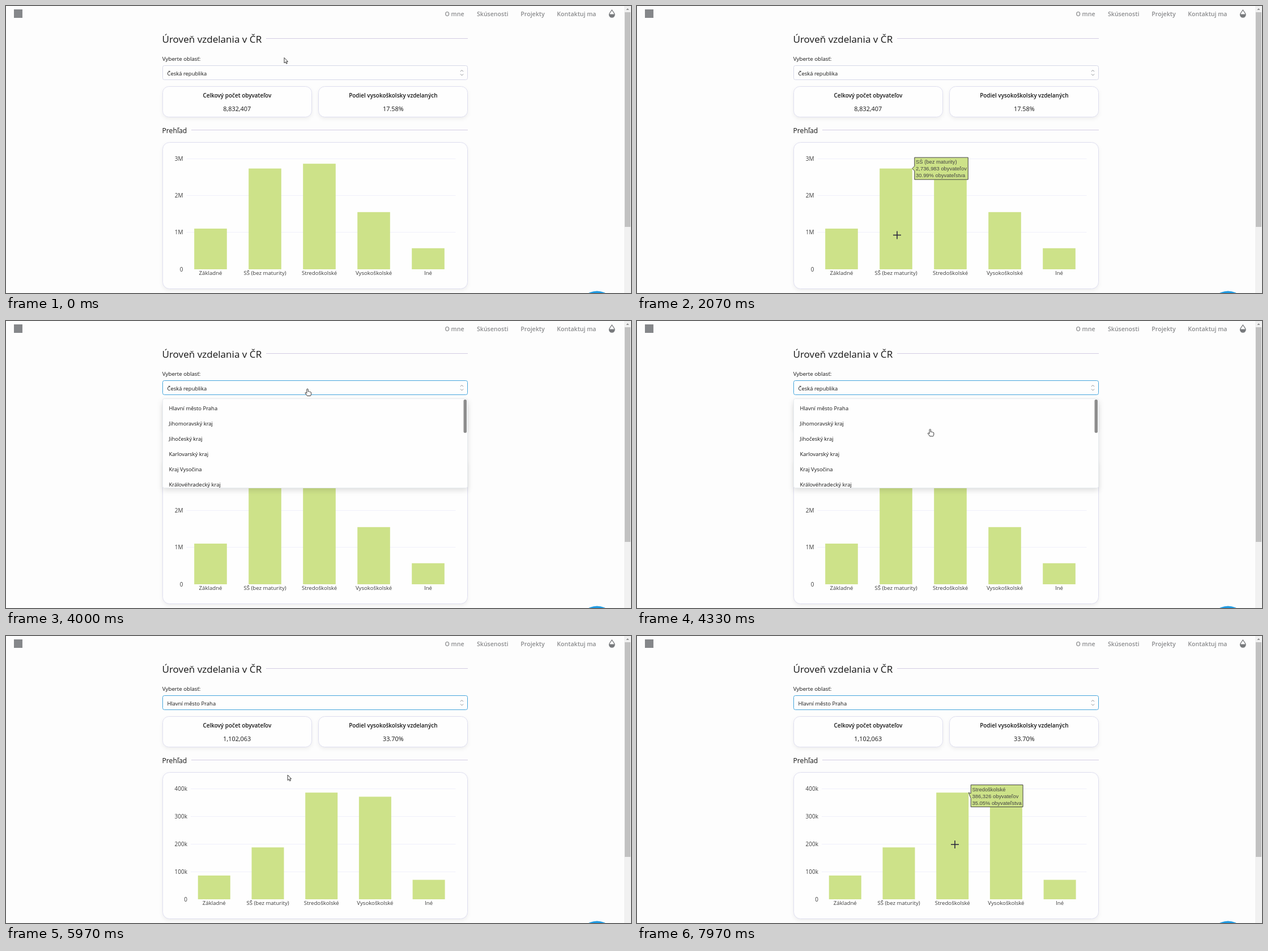
Animation of 1103x508 px, one loop 8000 ms. Source, as an HTML page:

```html
<!DOCTYPE html>
<html lang="sk">
<head>
<meta charset="utf-8">
<title>Úroveň vzdelania v ČR</title>
<style>
  html, body { margin: 0; width: 100%; height: 100%; overflow: hidden; background: #fdfdfd; }
  svg { display: block; width: 1103px; height: 508px; font-family: "Open Sans", "Noto Sans", sans-serif; font-size: 9.65px; fill: #141414; }
  .nav { font-size: 10.6px; font-weight: 600; fill: #8a8b8d; }
  .title { font-size: 17.1px; }
  .subtitle { font-size: 12.2px; }
  .label { font-size: 9.7px; font-weight: 500; }
  .item { font-size: 9.45px; }
  .head { font-size: 9.95px; font-weight: 600; }
  .stat { font-size: 10.9px; }
  .mid { text-anchor: middle; }
  .tick { font-size: 10px; text-anchor: end; fill: #3c3c3c; }
  .cat { text-anchor: middle; fill: #3c3c3c; }
  .rule { stroke: #d3cce2; }
  .grid { stroke: #f0f0fb; }
  .card { fill: #fefefe; stroke: #dedeef; filter: drop-shadow(0 3px 3px rgba(0, 0, 0, .06)); }
  .bar { fill: #cde289; }
  .tip { font-family: "Liberation Sans", Arial, sans-serif; font-size: 9.4px; fill: #444; }
  .tip path { fill: #cde289; stroke: #444; }
  #field { fill: #fefefe; stroke: #d6d8e8; }
  #field.focus { stroke: #45a5dc; }
  #menu .panel { fill: #fefefe; stroke: #e6eaee; filter: drop-shadow(0 4px 5px rgba(0, 0, 0, .12)); }
  .pointer { fill: #fff; stroke: #222; stroke-width: .9; stroke-linejoin: round; }
</style>
</head>
<body>
<svg viewBox="0 0 1103 508">
  <defs><clipPath id="menuClip"><rect x="276" y="138" width="539" height="157"/></clipPath></defs>

  <rect x="14" y="6" width="15" height="15" fill="#85878a"/>
  <g class="nav">
    <text x="774.5" y="18">O mne</text>
    <text x="831" y="18">Skúsenosti</text>
    <text x="908.3" y="18">Projekty</text>
    <text x="972.3" y="18">Kontaktuj ma</text>
  </g>
  <path d="M1069.3 7C1067.500 10 1064.500 12.300 1064.500 15.300A4.800 4.800 0 0 0 1074.100 15.300C1074.100 12.300 1071.100 10 1069.300 7Z" fill="none" stroke="#77797c" stroke-width="1.3"/>
  <path d="M1064.500 14.500H1074.100V15.300A4.800 4.800 0 0 1 1064.500 15.300Z" fill="#77797c"/>

  <text class="title" x="275.500" y="65">Úroveň vzdelania v ČR</text>
  <path class="rule" d="M459 57.500H815M327 219.500H815"/>
  <text class="label" x="275.800" y="96.500">Vyberte oblasť:</text>
  <rect id="field" x="276.500" y="105.500" width="538" height="25" rx="3"/>
  <text id="region" class="item" x="284.500" y="122.500"></text>
  <path d="M802 116L804.500 113.500L807 116M802 120.500L804.500 123L807 120.500" fill="none" stroke="#888d92"/>

  <rect class="card" x="276.500" y="142.500" width="263" height="54" rx="11"/>
  <rect class="card" x="551.500" y="142.500" width="263" height="54" rx="11"/>
  <g class="mid">
    <text class="head" x="407.800" y="161.500">Celkový počet obyvateľov</text>
    <text class="head" x="683.300" y="161.500">Podiel vysokoškolsky vzdelaných</text>
    <text id="total" class="stat" x="407.800" y="186"></text>
    <text id="share" class="stat" x="683.300" y="186"></text>
  </g>

  <text class="subtitle" x="275.500" y="224.500">Prehľad</text>
  <rect class="card" x="276.500" y="241.500" width="538" height="259" rx="12"/>
  <g id="charts"></g>

  <g id="tip" class="tip"><path/><text/><text/><text/></g>

  <g id="menu">
    <rect class="panel" x="276.500" y="137.500" width="538" height="158" rx="3"/>
    <g id="items" class="item" clip-path="url(#menuClip)"></g>
    <rect x="807.500" y="139" width="5.500" height="59" rx="2.500" fill="#8d8d8d"/>
  </g>

  <circle cx="1043" cy="537.500" r="33" fill="#1f9be3"/>
  <rect x="1091" width="12" height="508" fill="#f1f1f1"/>
  <rect x="1092" y="11" width="10" height="380" fill="#c1c1c1"/>
  <path d="M1094.500 7L1097 4L1099.500 7Z" fill="#8b8b8b"/>

  <g id="cursor">
    <path id="arrow" class="pointer" d="M.5 .5V10L2.700 8L4.200 11.200L5.800 10.500L4.300 7.400H7Z"/>
    <path id="hand" class="pointer" d="M-1.200 .8Q0 -1 1.200 .8V5Q2.500 4 3.300 5.300Q4.400 4.500 5 5.800Q6.200 5.200 6.500 6.600V9.500Q6.300 11 5.300 12.500H-.5Q-1.800 10.500 -4 7.800Q-4 6.300 -2.600 6.800L-1.200 8Z"/>
    <path id="cross" d="M-7 0H7M0 -7V7" stroke="#24213a" stroke-width="1.500"/>
  </g>
</svg>
<script>
const LOOP = 8000, OPEN = 4000, PICK = 5130, REDRAW = 5480;
const BASE = 466, PLOT_TOP = 270.5, SVG_TOP = 263.5;
const CATS = ['Základné', 'SŠ (bez maturity)', 'Stredoškolské', 'Vysokoškolské', 'Iné'];
const ITEMS = ['Hlavní město Praha', 'Jihomoravský kraj', 'Jihočeský kraj', 'Karlovarský kraj', 'Kraj Vysočina', 'Královéhradecký kraj'];

const country = {
  name: 'Česká republika', values: [1104200, 2736983, 2866900, 1552800, 571524],
  max: 3e6, ticks: ['0', '1M', '2M', '3M'], left: 312.5, first: 361, step: 96, width: 57.6
};
const capital = {
  name: ITEMS[0], values: [86000, 187884, 386326, 371395, 70458],
  max: 4e5, ticks: ['0', '100k', '200k', '300k', '400k'], left: 320, first: 367.3, step: 94.7, width: 57
};

// time, x, y of the pointer's hot spot
const PATH = [
  [0, 490.5, 91], [400, 490.5, 91], [1400, 474, 310], [2070, 459, 405.5], [2350, 459, 405.5],
  [3370, 568.5, 239], [3880, 532, 120], [4060, 532, 120], [4330, 517.3, 191.5],
  [4950, 508, 150], [5400, 508, 150], [6830, 475.5, 422], [7970, 561, 369], [LOOP, 561, 369]
];

const $ = id => document.getElementById(id);
const show = (el, on) => { el.style.display = on ? '' : 'none'; };
const sum = list => list.reduce((a, b) => a + b, 0);
const percent = (part, all) => (100 * part / all).toFixed(2) + '%';
const group = n => n.toLocaleString('en-US');

function add(parent, tag, attrs, text = '') {
  const el = document.createElementNS('http://www.w3.org/2000/svg', tag);
  for (const key in attrs) el.setAttribute(key, attrs[key]);
  el.textContent = text;
  return parent.appendChild(el);
}

function buildChart(data) {
  const g = add($('charts'), 'g', {});
  data.total = sum(data.values);
  data.ticks.forEach((label, i) => {
    const y = BASE - i * (BASE - PLOT_TOP) / (data.ticks.length - 1);
    if (i) add(g, 'path', { class: 'grid', d: `M${data.left + 6} ${Math.floor(y) + .5}H793.5` });
    add(g, 'text', { class: 'tick', x: data.left, y: y + 3.6 }, label);
  });
  data.bars = data.values.map((value, i) => {
    const mid = data.first + i * data.step;
    const height = value / data.max * (BASE - PLOT_TOP);
    const bar = { left: mid - data.width / 2, right: mid + data.width / 2, top: BASE - height, value, name: CATS[i] };
    add(g, 'rect', { class: 'bar', x: bar.left, y: bar.top, width: data.width, height });
    add(g, 'text', { class: 'cat', x: mid, y: 476.3 }, bar.name);
    return bar;
  });
  data.node = g;
}

function pointerAt(t) {
  const i = PATH.findIndex(p => p[0] > t);
  const [t0, x0, y0] = PATH[i - 1], [t1, x1, y1] = PATH[i];
  const u = (t - t0) / (t1 - t0), e = u * u * (3 - 2 * u);
  return [x0 + (x1 - x0) * e, y0 + (y1 - y0) * e];
}

function drawTip(bar, total) {
  show($('tip'), bar);
  if (!bar) return;
  const [box, ...lines] = $('tip').children;
  const texts = [bar.name, group(bar.value) + ' obyvateľov', percent(bar.value, total) + ' obyvateľstva'];
  const x = bar.right + 4, h = 39, top = Math.max(SVG_TOP, bar.top - h / 2), mid = top + h / 2;
  lines.forEach((line, i) => {
    line.textContent = texts[i];
    line.setAttribute('x', x + 2.3);
    line.setAttribute('y', top + 11 + i * 12.1);
  });
  const w = Math.max(...lines.map(line => line.getComputedTextLength())) + 4.7;
  box.setAttribute('d', `M${bar.right} ${bar.top}L${x} ${mid + 4.3}V${top + h}h${w}v${-h}H${x}V${mid - 4.3}Z`);
}

function draw(t) {
  const region = t < PICK ? country : capital;
  const chart = t < REDRAW ? country : capital;
  const open = t >= OPEN && t < PICK;
  const [x, y] = pointerAt(t);

  $('region').textContent = region.name;
  $('total').textContent = group(region.total);
  $('share').textContent = percent(region.values[3], region.total);
  $('field').classList.toggle('focus', t >= OPEN);
  show($('menu'), open);
  show(country.node, chart === country);
  show(capital.node, chart === capital);

  const overPlot = !open && y > SVG_TOP && y < BASE;
  const overField = y > 105 && y < 131 && t > 3000;
  drawTip(overPlot && chart.bars.find(b => x > b.left && x < b.right && y > b.top), chart.total);

  $('cursor').setAttribute('transform', `translate(${x} ${y})`);
  show($('cross'), overPlot);
  show($('hand'), open || overField);
  show($('arrow'), !overPlot && !open && !overField);
}

buildChart(country);
buildChart(capital);
ITEMS.forEach((name, i) => add($('items'), 'text', { x: 287.5, y: 158 + i * 27 }, name));

const start = performance.now();
function tick() {
  draw((performance.now() - start) % LOOP);
  requestAnimationFrame(tick);
}
tick();
</script>
</body>
</html>
```
